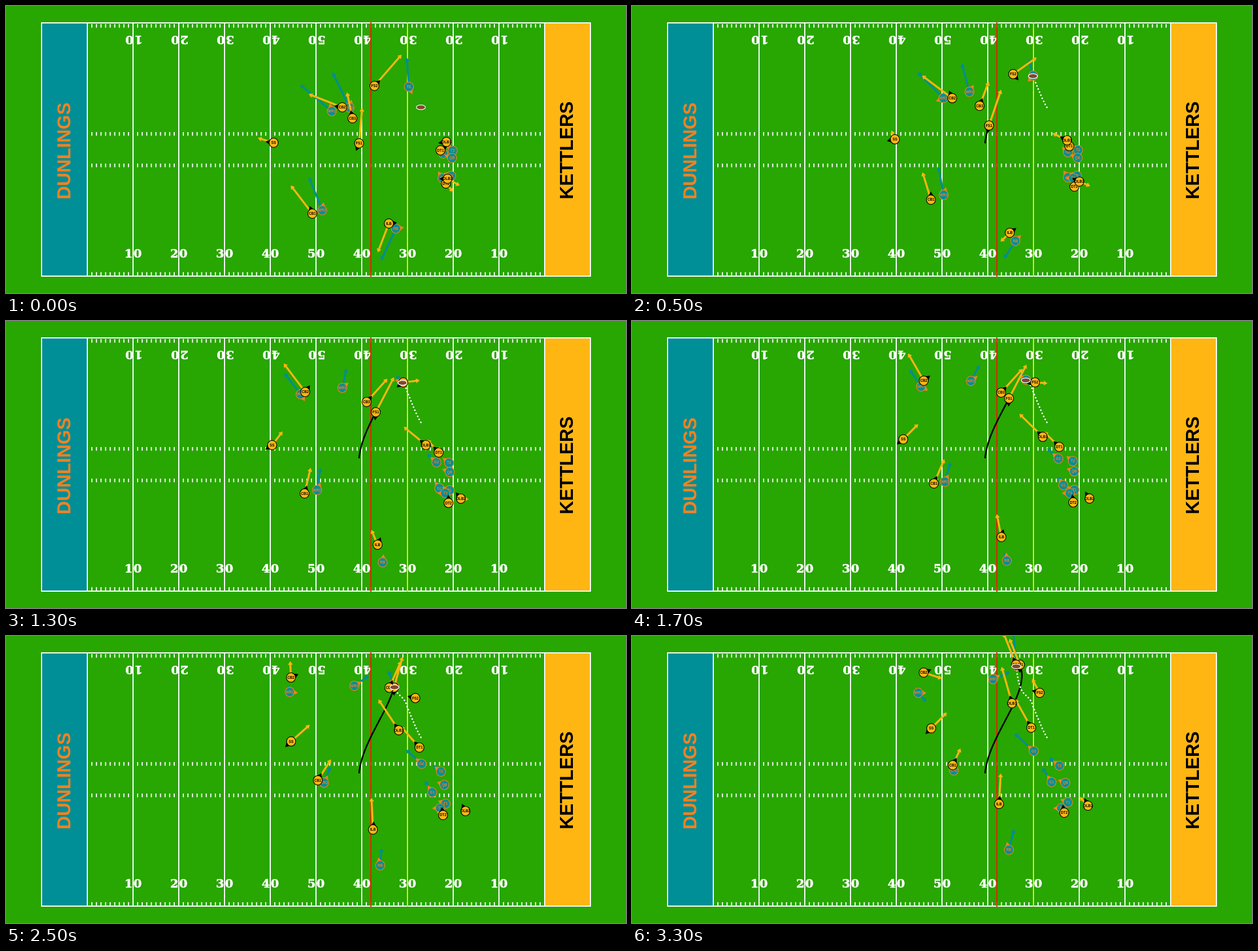
Write an HTML page that moves like this. It is 1098 px wide and 510 px high and loops after 3.4 s.

```html
<!DOCTYPE html>
<html lang="en">
<head>
<meta charset="utf-8">
<title>Play tracking</title>
<style>
  html, body { margin: 0; width: 100%; height: 100%; overflow: hidden; background: #28a602; }
  svg { display: block; width: 100%; height: 100%; }
  text { text-anchor: middle; font-weight: bold; font-family: "Liberation Sans", Arial, sans-serif; }
  .yard { font: 900 21px "DejaVu Serif", "Noto Serif", serif; letter-spacing: 1.5px; fill: #fff; stroke: #fff; stroke-width: .6; }
  .team { font-size: 33px; }
  .tag { font-size: 6.3px; }
</style>
</head>
<body>
<svg id="stage" viewBox="0 0 1098 510"></svg>
<script>
const NS = 'http://www.w3.org/2000/svg';
const stage = document.getElementById('stage');
const LOOP = 3400, STEP = 100, SPAN = 3.3;
const KEYS = [0, .9, 2.1, SPAN];
const TEAL = '#008e97', ORANGE = '#f58220', GOLD = '#ffb612', BLACK = '#000';

function el(name, attrs, parent = stage, text) {
  const node = document.createElementNS(NS, name);
  for (const key in attrs) node.setAttribute(key, attrs[key]);
  if (text) node.textContent = text;
  parent.appendChild(node);
  return node;
}

// ---- field ----
function drawField() {
  const yardX = n => 144 + 8.1 * n;
  el('rect', { x: 63, y: 30, width: 81, height: 450, fill: TEAL });
  el('rect', { x: 954, y: 30, width: 81, height: 450, fill: GOLD });

  let lines = '', ticks = '';
  for (let n = 0; n <= 100; n++) {
    const x = yardX(n).toFixed(1);
    if (n % 10 === 0) lines += `M${x} 30V480`;
    else for (const y of [32, 224, 280, 473]) ticks += `M${x} ${y}v6.5`;
  }
  el('path', { d: ticks, stroke: '#fff', 'stroke-width': 1.9 });
  el('path', { d: lines, stroke: '#fff', 'stroke-width': 2 });
  el('rect', { x: 63, y: 30, width: 972, height: 450, fill: 'none', stroke: '#fff', 'stroke-width': 2 });

  for (let n = 10; n < 100; n += 10) {
    const label = String(50 - Math.abs(50 - n));
    el('text', { class: 'yard', transform: `translate(${yardX(n) + .8} 447)` }, stage, label);
    el('text', { class: 'yard', transform: `translate(${yardX(n) + 1} 53) rotate(180)` }, stage, label);
  }
  el('path', { d: 'M646.2 29V481', stroke: '#f01800', 'stroke-width': 2 });
  el('path', { d: 'M711 29V481', stroke: '#ffee00', 'stroke-width': 2 });
  el('text', { class: 'team', fill: ORANGE, transform: 'translate(114.3 257.7) rotate(-90)' }, stage, 'DUNLINGS');
  el('text', { class: 'team', fill: BLACK, transform: 'translate(1003.5 256.5) rotate(-90)' }, stage, 'KETTLERS');
}

// ---- motion: every path is a function of t that returns [x, y] ----
const mix = (a, b, u) => a + (b - a) * u;

// Cubic through four points, reached at KEYS.
function run(...points) {
  return t => {
    const pos = [0, 0];
    points.forEach((p, i) => {
      const weight = KEYS.reduce((w, k, j) => j === i ? w : w * (t - k) / (KEYS[i] - k), 1);
      pos[0] += weight * p[0];
      pos[1] += weight * p[1];
    });
    return pos;
  };
}

// Slow start, then a steady push from a to b.
const drift = (a, b) => t => {
  const u = Math.pow(Math.max(0, t) / SPAN, 1.8);
  return [mix(a[0], b[0], u), mix(a[1], b[1], u)];
};

// Straight throw from a point, then carried by the receiver.
const pass = (from, receiver, duration) => t => {
  const u = Math.min(1, t / duration), [x, y] = receiver(t);
  return [mix(from[0], x - .5, u), mix(from[1], y + 1, u)];
};

function velocity(path, t) {
  const d = .01, a = path(t - d), b = path(t + d);
  return [(b[0] - a[0]) / (2 * d), (b[1] - a[1]) / (2 * d)];
}

function trace(path, t) {
  const points = [];
  for (let i = 0; i <= Math.round(t / .05); i++) points.push(path(i * .05).map(v => v.toFixed(1)).join(' '));
  return 'M' + points.join('L');
}

// ---- players ----
const players = [];

// turn: first and last facing in degrees; without it a player faces the way he moves
function player(label, fill, accent, path, turn) {
  const g = el('g', {});
  const arrow = el('g', {}, g);
  const shaft = el('path', { d: 'M0 0', stroke: fill, 'stroke-width': 3.4 }, arrow);
  const head = el('path', { d: 'M0 0L-6.5 -4.3V4.3Z', fill }, arrow);
  const nose = el('path', { d: 'M14.5 0L6 -5V5Z', fill: accent }, g);
  el('ellipse', { rx: 8.1, ry: 8.4, fill, stroke: accent, 'stroke-width': 1.2 }, g);
  el('text', { class: 'tag', y: 2.2, fill: accent }, g, label);

  players.push(t => {
    const [x, y] = path(t), [vx, vy] = velocity(path, t);
    const speed = Math.hypot(vx, vy), heading = Math.atan2(vy, vx) * 180 / Math.PI;
    const facing = turn ? mix(turn[0], turn[1], 1 - Math.pow(1 - t / SPAN, 3)) : heading;
    g.setAttribute('transform', `translate(${x} ${y})`);
    arrow.setAttribute('transform', `rotate(${heading})`);
    shaft.setAttribute('d', `M0 0H${Math.max(0, speed - 5)}`);
    head.setAttribute('transform', `translate(${speed})`);
    nose.setAttribute('transform', `rotate(${facing})`);
  });
}
const off = (label, path, turn) => player(label, TEAL, ORANGE, path, turn);
const def = (label, path, turn) => player(label, GOLD, BLACK, path, turn);

drawField();
const runTrail = el('path', { fill: 'none', stroke: BLACK, 'stroke-width': 2.7 });
const ballTrail = el('path', {
  fill: 'none', stroke: '#fff', 'stroke-width': 3, 'stroke-linecap': 'round', 'stroke-dasharray': '0 6'
});

const tightEnd = run([713.5, 143.5], [707, 114.5], [693, 99], [681, 53]);
const safety = run([625.3, 244], [642.5, 187], [679, 114], [687, 51]);
const flight = pass([734.7, 180], tightEnd, .5);

off('WR1', run([577, 187], [535, 146], [505.5, 106], [507, 101]), [255, 2]);
off('WR2', run([560, 363], [550, 317], [558.5, 272.5], [570, 239]), [-80, -62]);
off('WR3', run([608.5, 180.5], [594.5, 134], [607.5, 96.5], [639.5, 76.5]), [-76, -30]);
off('TE', tightEnd, [65, 235]);
off('RB', run([690.5, 395.5], [672, 426.5], [662.5, 418.5], [667.5, 380]), [-8, -105]);
off('T2', drift([791, 257], [757, 230.5]));
off('G2', drift([774, 262], [711.5, 204.5]));
off('QB', drift([790, 270], [767.5, 261]));
off('G1', drift([773, 306], [743, 259.5]));
off('T1', drift([788.5, 302], [772, 295.5]));
off('T3', drift([782, 306], [760.5, 306]));

def('SS', run([474, 243], [466, 229.5], [492, 199], [530, 164]), [188, 135]);
def('FS1', safety, [112, 90]);
def('FS2', run([652.5, 142], [690.5, 112.5], [721, 110], [722, 101]), [-45, 197]);
def('CB1', run([542.5, 369], [526.5, 325], [543, 272], [568, 229.5]), [-108, -63]);
def('CB2', run([595.5, 180], [547, 146], [508, 88], [516.5, 65]), [-170, -22]);
def('CB3', run([613.5, 199.5], [625, 160.5], [668, 110], [680, 51]));
def('ILB', run([678, 386.5], [663, 404.5], [651.5, 365.5], [650, 298.5]), [-5, -85]);
def('DT1', run([769.5, 256.5], [772.5, 242], [745, 212], [707, 163]));
def('OLB1', run([780, 241.5], [758.5, 231.5], [711, 188], [673, 119.5]));
def('DT2', run([779, 315.5], [784.5, 323], [778, 320.5], [765.5, 314]), [-60, -100]);
def('OLB2', run([782, 307], [799.5, 314.5], [813, 314], [807.5, 301.5]), [180, 245]);

const ball = el('ellipse', { rx: 8, ry: 4.2, fill: '#80492f', stroke: '#fff', 'stroke-width': 1.3 });

function render(t) {
  for (const update of players) update(t);
  const [x, y] = flight(t);
  ball.setAttribute('transform', `translate(${x} ${y})`);
  runTrail.setAttribute('d', trace(safety, t));
  ballTrail.setAttribute('d', t ? trace(flight, t) : 'M0 0');
}

const start = performance.now();
function tick() {
  const ms = (performance.now() - start) % LOOP;
  render(Math.floor(ms / STEP) * STEP / 1000);
  requestAnimationFrame(tick);
}
tick();
</script>
</body>
</html>
```
